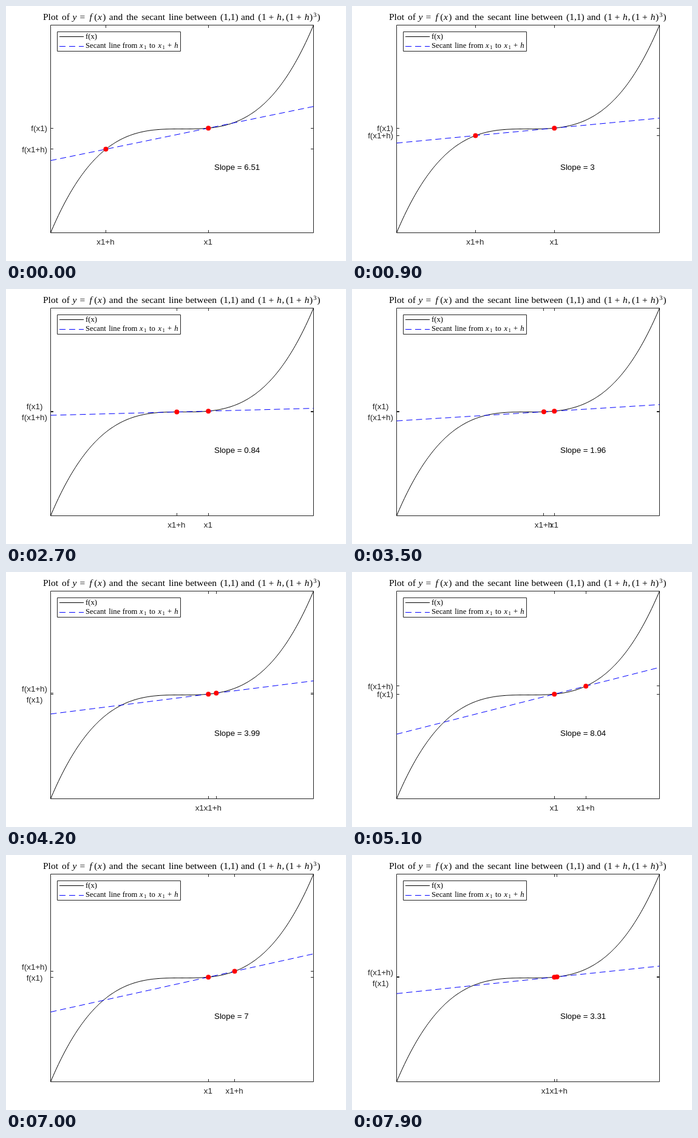
Recreate the animation shown at these times as an HTML page with a canvas. Size 560x420 px, loop 8000 ms.

```html
<!DOCTYPE html>
<html lang="en">
<head>
<meta charset="utf-8">
<title>Secant line</title>
<style>
html, body { margin: 0; width: 100%; height: 100%; overflow: hidden; background: #fff; }
canvas { display: block; }
</style>
</head>
<body>
<canvas id="stage" width="560" height="420"></canvas>
<script>
const ctx = document.getElementById('stage').getContext('2d');
const SANS = '13.333px "Liberation Sans", Arial, sans-serif';
const SERIF = '"Liberation Serif", "Times New Roman", serif';
const INK = '#262626';
const L = 73.5, T = 31.5, W = 433, H = 342, R = L + W, B = T + H;
const LOOP = 8000, STEP = 100;

const px = x => L + (x + 5) / 10 * W;
const py = y => B - (y + 125) / 250 * H;
const snap = v => Math.floor(v) + 0.5;

function line(points, color, dash = []) {
  ctx.beginPath();
  points.forEach(p => ctx.lineTo(...p));
  ctx.setLineDash(dash);
  ctx.strokeStyle = color;
  ctx.stroke();
}

function label(text, x, y, align, color = INK) {
  ctx.font = SANS;
  ctx.textAlign = align;
  ctx.fillStyle = color;
  ctx.fillText(text, x, y);
}

// Pairs of x and word; a leading * means italic.
function formula(size, y, ...items) {
  ctx.textAlign = 'left';
  ctx.fillStyle = '#000';
  for (let i = 0; i < items.length; i += 2) {
    const italic = items[i + 1][0] === '*';
    ctx.font = (italic ? 'italic ' : '') + size + 'px ' + SERIF;
    ctx.fillText(items[i + 1].slice(italic ? 1 : 0), items[i], y);
  }
}

function title(tangent) {
  ctx.save();
  if (tangent) ctx.translate(83.5, 0);
  formula(15.5, 23, 61, 'Plot', 92, 'of', 109.4, '*y', 121.5, '=', 137.5, '*f', 145.2, '(',
    151, '*x', 159.2, ')', 169.8, 'and', 198.2, 'the');
  if (tangent) {
    formula(15.5, 23, 223.3, 'tangent', 276.8, 'line', 304.3, 'at', 322.1, '(1,1)');
  } else {
    formula(15.5, 23, 223.3, 'secant', 267.9, 'line', 295.4, 'between', 353, '(1,1)',
      386.9, 'and', 415.2, '(', 420.9, '1', 432.4, '+', 446, '*h', 454.4, ',',
      460.9, '(', 466.6, '1', 478.1, '+', 491.7, '*h', 500.1, ')', 512.6, ')');
    formula(10.5, 18, 506.3, '3');
  }
  ctx.restore();
}

function legend() {
  ctx.fillStyle = '#fff';
  ctx.fillRect(84.5, 42.5, 203, 32);
  line([[84.5, 42.5], [287.5, 42.5], [287.5, 74.5], [84.5, 74.5], [84.5, 42.5]], INK);
  line([[88, 50.5], [128, 50.5]], '#000');
  line([[88, 66.5], [128, 66.5]], '#00f', [10, 6]);
  formula(12.7, 54, 131, 'f(x)');
  formula(12.7, 69, 131, 'Secant', 169.3, 'line', 191.8, 'from', 219.9, '*x', 236, 'to',
    250.6, '*x', 266, '+', 277.3, '*h');
  formula(8.8, 71, 226.9, '1', 257.6, '1');
}

function ticks(q) {
  for (const x of [1, q]) {
    const u = snap(px(x)), v = snap(py(x ** 3));
    line([[u, B], [u, B - 4.5]], INK);
    line([[u, T], [u, T + 4.5]], INK);
    line([[L, v], [L + 4.5, v]], INK);
    line([[R, v], [R - 4.5, v]], INK);
  }
}

function tickLabels(q) {
  if (q === 1) {
    label('x1=x1+h', px(1), 393, 'center');
    label('f(x1)=f(x1+h)', 68, 206, 'right');
    return;
  }
  const pts = [{ x: 1, name: 'x1' }, { x: q, name: 'x1+h' }].sort((a, b) => a.x - b.x);
  const [lo, hi] = pts;

  // Labels whose ticks nearly meet are joined into one block.
  if (px(hi.x) - px(lo.x) < 15) {
    label(lo.name + hi.name, px(lo.x), 393, 'center');
  } else {
    pts.forEach(p => label(p.name, px(p.x) - 0.5, 393, 'center'));
  }

  const top = py(hi.x ** 3), bottom = py(lo.x ** 3);
  if (bottom - top < 10.5) {
    const y = Math.round(top - 2.8);
    label(`f(${hi.name})`, 47, y, 'center');
    label(`f(${lo.name})`, 47, y + 18, 'center');
  } else {
    pts.forEach(p => label(`f(${p.name})`, 68, Math.round(py(p.x ** 3) + 5), 'right'));
  }
}

function draw(q) {
  const slope = 1 + q + q * q;
  ctx.fillStyle = '#fff';
  ctx.fillRect(0, 0, 560, 420);
  ctx.lineWidth = 1;

  line([[L, T], [R, T], [R, B], [L, B], [L, T]], INK);
  ticks(q);
  tickLabels(q);
  title(q === 1);

  const curve = Array.from({ length: 201 }, (_, i) => i / 20 - 5);
  line(curve.map(x => [px(x), py(x ** 3)]), '#000');
  line([-5, 5].map(x => [px(x), py(1 + slope * (x - 1))]), '#00f', [10, 6]);

  ctx.fillStyle = '#f00';
  for (const x of [1, q]) {
    ctx.beginPath();
    ctx.arc(px(x), py(x ** 3), 4, 0, 7);
    ctx.fill();
  }
  label('Slope = ' + Number(slope.toFixed(2)), 343, 270, 'left', '#000');
  legend();
}

const start = performance.now();
function tick() {
  const n = Math.floor((performance.now() - start) % LOOP / STEP);
  draw((n < 60 ? n - 29 : 90 - n) / 10);
  requestAnimationFrame(tick);
}
tick();
</script>
</body>
</html>
```
